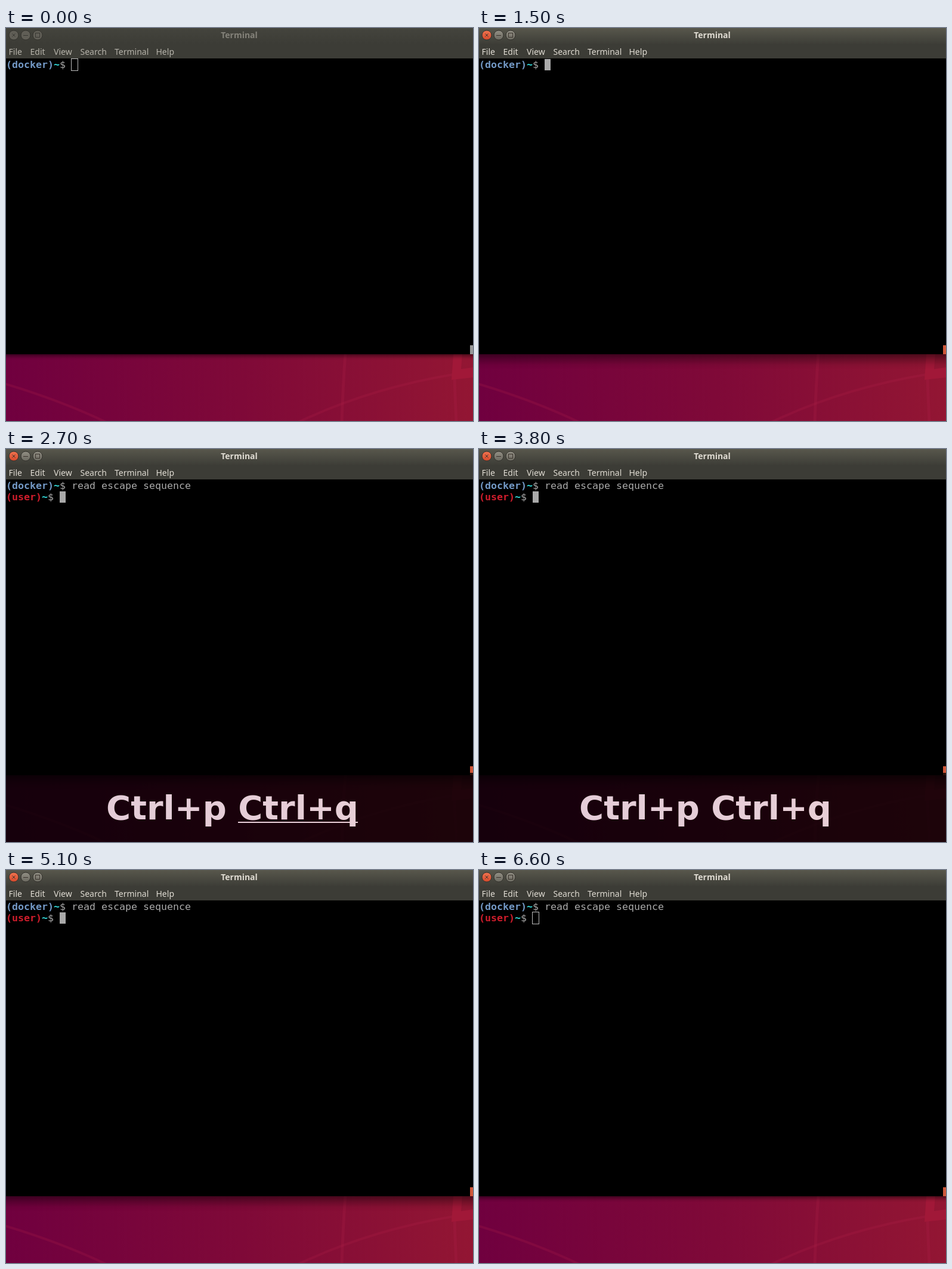
Write an HTML page that moves like this. It is 783 by 659 pixels and loops after 6.7 s.

```html
<!DOCTYPE html>
<html lang="en">
<head>
<meta charset="utf-8">
<title>Terminal</title>
<style>
html, body { margin: 0; width: 100%; height: 100%; overflow: hidden; background: #000; }
svg { display: block; width: 783px; height: 659px; }
text { white-space: pre; }
.ui { font: 14px "Noto Sans", sans-serif; }
.title { font-weight: 700; text-anchor: middle; }
.term { font: 16.61px "DejaVu Sans Mono", monospace; fill: #aaa; }
.term .b { font-weight: 700; }
.docker { fill: #7399c6; }
.user { fill: #cf1d2c; }
.home { fill: #34e2e2; }
.keys { font: 700 56px "DejaVu Sans", sans-serif; text-anchor: middle; }
.block { fill: #aaa; }
.hollow { fill: none; stroke: #bbb; }

.t { animation: 6.7s step-end infinite; }
.focus { animation-name: focus; }
.active { animation-name: active; }
.inactive { animation-name: inactive; }
.blinkA { animation-name: blinkA; }
.blinkB { animation-name: blinkB; }
.idleA { animation-name: idleA; }
.idleB { animation-name: idleB; }
.output { animation-name: output; }
.banner { animation-name: banner; }
.first { animation-name: first; }
.both { animation-name: both; }
.lineP { animation-name: lineP; }
.lineQ { animation-name: lineQ; }

@keyframes focus { 0% { opacity: 0; } 7.46% { opacity: .08; } 8.95% { opacity: .55; } 10.44%, 100% { opacity: 1; } }
@keyframes active { 0%, 98.5%, 100% { opacity: 0; } 7.46% { opacity: 1; } }
@keyframes inactive { 0%, 98.5%, 100% { opacity: 1; } 7.46% { opacity: 0; } }
@keyframes blinkA { 0%, 16.41%, 38.8%, 100% { opacity: 0; } 7.46%, 22.38% { opacity: 1; } }
@keyframes blinkB {
  0%, 47.76%, 67.16%, 85.07%, 98.5%, 100% { opacity: 0; }
  38.8%, 56.71%, 76.11%, 92.53% { opacity: 1; }
}
@keyframes idleA { 0% { opacity: 1; } 7.46%, 100% { opacity: 0; } }
@keyframes idleB { 0% { opacity: 0; } 98.5%, 100% { opacity: 1; } }
@keyframes output { 0% { opacity: 0; } 38.8%, 100% { opacity: 1; } }
@keyframes banner { 0%, 61.19%, 100% { opacity: 0; } 31.34% { opacity: .8; } }
@keyframes first { 0%, 100% { opacity: 1; } 40.29% { opacity: 0; } }
@keyframes both { 0%, 100% { opacity: 0; } 40.29% { opacity: 1; } }
@keyframes lineP { 0%, 32.83%, 100% { opacity: 0; } 31.34% { opacity: 1; } }
@keyframes lineQ { 0%, 41.79%, 100% { opacity: 0; } 40.29% { opacity: 1; } }
</style>
</head>
<body>
<svg viewBox="0 0 783 659" xmlns="http://www.w3.org/2000/svg">
  <defs>
    <linearGradient id="wall" gradientUnits="userSpaceOnUse" x1="0" y1="640" x2="783" y2="560">
      <stop offset="0" stop-color="#70003f"/>
      <stop offset=".5" stop-color="#7f0938"/>
      <stop offset="1" stop-color="#931633"/>
    </linearGradient>
    <linearGradient id="shade" x2="0" y2="1">
      <stop offset="0" stop-color="#000" stop-opacity=".48"/>
      <stop offset=".35" stop-color="#000" stop-opacity=".24"/>
      <stop offset=".7" stop-color="#000" stop-opacity=".06"/>
      <stop offset="1" stop-color="#000" stop-opacity="0"/>
    </linearGradient>
    <linearGradient id="barOn" x2="0" y2="1">
      <stop offset="0" stop-color="#58574c"/>
      <stop offset="1" stop-color="#3d3d37"/>
    </linearGradient>
    <linearGradient id="barOff" x2="0" y2="1">
      <stop offset="0" stop-color="#44443d"/>
      <stop offset="1" stop-color="#3c3c36"/>
    </linearGradient>
    <linearGradient id="red" x2="0" y2="1">
      <stop offset="0" stop-color="#f07450"/>
      <stop offset="1" stop-color="#d4492b"/>
    </linearGradient>
    <linearGradient id="grey" x2="0" y2="1">
      <stop offset="0" stop-color="#928f84"/>
      <stop offset="1" stop-color="#6b6960"/>
    </linearGradient>
    <g id="glyphs" fill="none">
      <path d="M10.5 9.5l5 5m0-5l-5 5M29 12.5h8"/>
      <rect x="49.5" y="8.5" width="7" height="7"/>
    </g>
    <g id="menu" class="ui">
      <text x="4.500" y="45">File</text>
      <text x="40.500" y="45">Edit</text>
      <text x="80" y="45">View</text>
      <text x="124.500" y="45">Search</text>
      <text x="182" y="45">Terminal</text>
      <text x="251.500" y="45">Help</text>
      <text class="title" x="391" y="17">Terminal</text>
    </g>
  </defs>

  <!-- desktop -->
  <rect y="540" width="783" height="119" fill="url(#wall)"/>
  <g fill="none" stroke="#b02048" stroke-opacity=".22" stroke-width="4">
    <path d="M-4 596Q90 624 168 661"/>
    <path d="M490 661Q610 604 750 581"/>
    <path d="M569 545Q565 600 563 661M752 588Q753 620 755 661" stroke-width="5"/>
  </g>
  <path d="M750 547h15l-2 25 20-3v17l-36 4z" fill="#a11838"/>
  <rect class="t inactive" y="547" width="783" height="10" fill="url(#shade)" opacity=".7"/>
  <rect class="t active" y="547" width="783" height="25" fill="url(#shade)"/>

  <!-- window -->
  <rect width="783" height="547"/>
  <rect y="27" width="783" height="24" fill="#3c3c36"/>
  <rect width="783" height="27" fill="url(#barOff)"/>
  <g fill="#605e56" stroke="#34332e">
    <circle cx="13" cy="12" r="8"/>
    <circle cx="33" cy="12" r="8"/>
    <circle cx="53" cy="12" r="8"/>
  </g>
  <use href="#glyphs" stroke="#383732"/>
  <g fill="#b5b2a9">
    <use href="#menu"/>
  </g>
  <rect x="330" width="120" height="27" fill="url(#barOff)"/>
  <text class="ui title" x="391" y="17" fill="#84827a">Terminal</text>
  <rect x="778" y="532" width="5" height="15" fill="#999"/>

  <g class="t focus">
    <rect width="783" height="27" fill="url(#barOn)"/>
    <rect y="27" width="783" height="24" fill="#3c3c36"/>
    <g stroke="#32312c">
      <circle cx="13" cy="12" r="8" fill="url(#red)"/>
      <circle cx="33" cy="12" r="8" fill="url(#grey)"/>
      <circle cx="53" cy="12" r="8" fill="url(#grey)"/>
    </g>
    <use href="#glyphs" stroke="#3a332d"/>
    <use href="#menu" fill="#dfdbd2"/>
    <rect x="778" y="532" width="5" height="15" fill="#d0583a"/>
  </g>

  <!-- shell -->
  <g class="term">
    <text x="0" y="67"><tspan class="b docker">(docker)</tspan><tspan class="b home">~</tspan>$</text>
    <g class="t output">
      <text x="110" y="67">read escape sequence</text>
      <text x="0" y="86"><tspan class="b user">(user)</tspan><tspan class="b home">~</tspan>$</text>
    </g>
  </g>
  <rect class="t idleA hollow" x="109.500" y="51.500" width="11" height="20"/>
  <rect class="t blinkA block" x="110" y="52" width="10" height="19"/>
  <rect class="t idleB hollow" x="89.500" y="70.500" width="11" height="20"/>
  <rect class="t blinkB block" x="90" y="71" width="10" height="19"/>

  <!-- pressed keys -->
  <g class="t banner" fill="#fff">
    <rect y="543" width="783" height="116" fill="#000"/>
    <g class="keys">
      <text class="t first" x="379.500" y="621">Ctrl+p</text>
      <text class="t both" x="379.500" y="621">Ctrl+p Ctrl+q</text>
    </g>
    <rect class="t lineP" x="279" y="625" width="201" height="2"/>
    <rect class="t lineQ" x="389" y="625" width="201" height="2"/>
  </g>
</svg>
</body>
</html>
```
